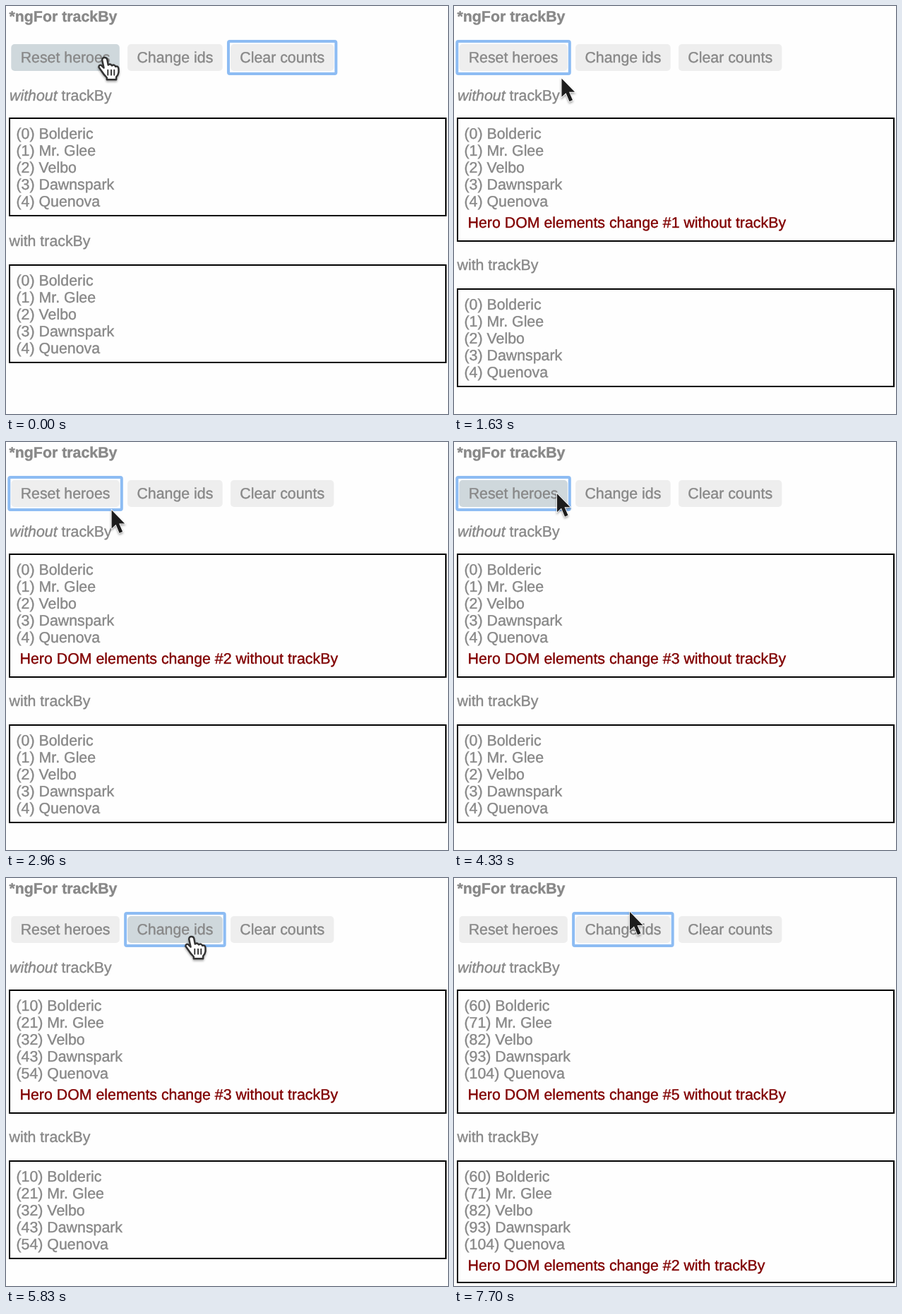
An HTML page for the animation above (8 s loop, 626x578 px).

```html
<!DOCTYPE html>
<html lang="en">
<head>
<meta charset="utf-8">
<title>ngFor trackBy</title>
<style>
  html, body { margin: 0; width: 100%; height: 100%; overflow: hidden; background: #fefefe; }
  svg { display: block; }
  text {
    font: 21.333px "Liberation Sans", Arial, sans-serif; fill: #888; stroke: #888; stroke-width: .4;
    text-rendering: geometricPrecision; white-space: pre;
  }
  .title { font-weight: bold; }
  .em { font-style: italic; }
  .warning { fill: #800000; stroke: #800000; }
  .box { fill: none; stroke: #000; stroke-width: 2; }
  #ring { fill: #fefefe; stroke: #8dbcf3; stroke-width: 4; }
  #cursor { filter: drop-shadow(0 2px 1.5px rgba(0, 0, 0, .35)); }
</style>
</head>
<body>
<svg id="stage" width="626" height="578" viewBox="0 0 626 578">
  <text class="title" x="4.5" y="22">*ngFor trackBy</text>
  <rect id="ring" y="50" height="46" rx="2"/>
  <g id="buttons"></g>
  <text x="5" y="134"><tspan class="em">without</tspan> trackBy</text>
  <g id="plain"></g>
  <g id="tracked"><text x="4.5" y="140">with trackBy</text></g>
  <g id="cursor">
    <path id="arrow" transform="translate(1 1)" d="M0 0V26L6 20.5 11 32.5 15.500 30.500 10.500 19H18.500Z" fill="#1c1c1c" stroke="#fff" stroke-width="1.6" paint-order="stroke"/>
    <g id="hand" transform="translate(-1 -1) scale(.95)" stroke="#333" stroke-width="2.6" stroke-linejoin="round" stroke-linecap="round">
      <path fill="#fff" d="M-4 4Q-4 0-.5 0 3 0 3.500 3L5 11Q8 8.500 10.500 12 14 9.500 16 13.500 20 12 20.500 17V22Q20 26 17 29V33H3V30Q-2 25-5 20L-9 14.500Q-9 10.500-5.500 11.500L-1.500 15.500Z"/>
      <path fill="none" stroke-width="2" d="M4.500 18.500V26M9.500 18.500V26M14 18.500V26"/>
    </g>
  </g>
</svg>
<script>
const LOOP = 8000;
const HEROES = ['Bolderic', 'Mr. Glee', 'Velbo', 'Dawnspark', 'Quenova'];
const LABELS = ['Reset heroes', 'Change ids', 'Clear counts'];
const PADDING = 13.33, BUTTON_GAP = 11.3, LINE = 24;

const RESET = { focusAt: 860, clicks: [1030, 2430, 3660] };
const CHANGE = { focusAt: 5600, clicks: [5830, 7360] };
const COUNT_DELAY = 30; // changed ids show just before their counters

const SPOT = {
  start: [141, 74], onReset: [140, 76], belowReset: [152, 103], resetEdge: [145, 72],
  onChange: [264, 84], belowChange: [261, 95], above: [248, 47]
};
const MOVES = [
  { from: 300, to: 560, spot: SPOT.onReset },
  { from: 1100, to: 1300, spot: SPOT.belowReset },
  { from: 1570, to: 2060, spot: SPOT.onReset },
  { from: 2430, to: 2730, spot: SPOT.belowReset },
  { from: 2870, to: 3130, spot: SPOT.onReset },
  { from: 3930, to: 4000, spot: SPOT.resetEdge },
  { from: 4330, to: 4860, spot: SPOT.onChange, dip: 28 },
  { from: 5970, to: 6430, spot: SPOT.belowChange },
  { from: 6700, to: 6900, spot: SPOT.onChange },
  { from: 7570, to: 7700, spot: SPOT.above }
];

const $ = id => document.getElementById(id);
const countPast = (t, times, delay = 0) => times.filter(time => t >= time + delay).length;
const setText = (node, value) => { if (node.textContent !== value) node.textContent = value; };
const show = (node, on) => node.setAttribute('visibility', on ? 'visible' : 'hidden');
const smooth = k => k * k * (3 - 2 * k);

function add(parent, name, attrs, text = '') {
  const node = document.createElementNS('http://www.w3.org/2000/svg', name);
  for (const key in attrs) node.setAttribute(key, attrs[key]);
  node.textContent = text;
  parent.append(node);
  return node;
}

function makeButtons() {
  let x = 7.3;
  return LABELS.map(label => {
    const rect = add($('buttons'), 'rect', { x, y: 54, height: 38, rx: 5 });
    const text = add($('buttons'), 'text', { x: x + PADDING, y: 80 }, label);
    const button = { rect, x, width: text.getComputedTextLength() + 2 * PADDING };
    rect.setAttribute('width', button.width);
    x += button.width + BUTTON_GAP;
    return button;
  });
}

function makeList(parent, top) {
  return {
    box: add(parent, 'rect', { class: 'box', x: 5, y: top + 1, width: 618 }),
    rows: HEROES.map((_, i) => add(parent, 'text', { x: 14.5, y: top + 30 + i * LINE })),
    warning: add(parent, 'text', { class: 'warning', x: 19.6, y: top + 156 })
  };
}

const buttons = makeButtons();
const plain = makeList($('plain'), 158);
const tracked = makeList($('tracked'), 166);

function pointerAt(t) {
  let [x, y] = SPOT.start;
  for (const { from, to, spot, dip = 0 } of MOVES) {
    if (t < from) break;
    const k = Math.min(1, (t - from) / (to - from)), eased = smooth(k);
    x += (spot[0] - x) * eased;
    y += (spot[1] - y) * eased + dip * Math.sin(Math.PI * k);
  }
  return [x, y];
}

function updateList(list, idRound, changes, suffix, openHeight) {
  HEROES.forEach((hero, i) => {
    const id = idRound ? i + 10 * (i + 1 + HEROES.length * (idRound - 1)) : i;
    setText(list.rows[i], `(${id}) ${hero}`);
  });
  setText(list.warning, changes ? `Hero DOM elements change #${changes} ${suffix} trackBy` : '');
  list.box.setAttribute('height', (changes ? openHeight : 140) - 2);
}

function render(t) {
  const idRound = countPast(t, CHANGE.clicks);
  const trackedChanges = countPast(t, CHANGE.clicks, COUNT_DELAY);
  const plainChanges = countPast(t, RESET.clicks) + trackedChanges;
  updateList(plain, idRound, plainChanges, 'without', 176);
  updateList(tracked, idRound, trackedChanges, 'with', 174);
  $('tracked').setAttribute('transform', `translate(0 ${plainChanges ? 234 : 200})`);

  const focused = buttons[t < RESET.focusAt ? 2 : t < CHANGE.focusAt ? 0 : 1];
  $('ring').setAttribute('x', focused.x - 3);
  $('ring').setAttribute('width', focused.width + 6);

  const [x, y] = pointerAt(t);
  let hovered = false;
  for (const b of buttons) {
    const over = x >= b.x && x <= b.x + b.width && y >= 54 && y <= 92;
    b.rect.setAttribute('fill', over ? '#cfd8dc' : '#eee');
    hovered ||= over;
  }
  // The arrow lingers at the edge of the first button before moving on.
  const isHand = hovered && !(t >= 4000 && t < 4600);
  show($('hand'), isHand);
  show($('arrow'), !isHand);
  $('cursor').setAttribute('transform', `translate(${x} ${y})`);
}

const start = performance.now();
function tick() {
  render((performance.now() - start) % LOOP);
  requestAnimationFrame(tick);
}
tick();
</script>
</body>
</html>
```
